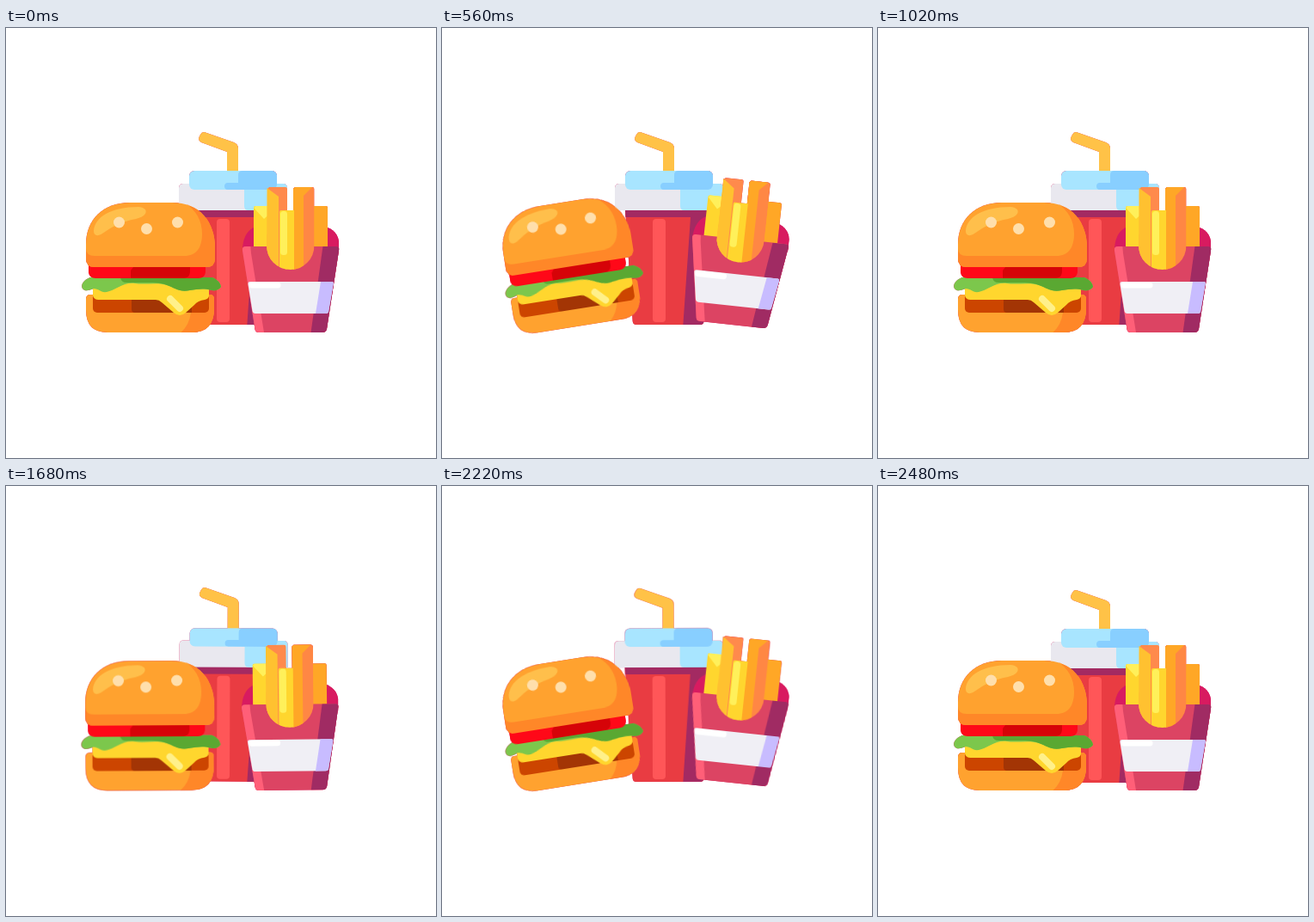
Animation of 500x500 px, one loop 3020 ms. Source, as an HTML page:

```html
<!DOCTYPE html>
<html lang="en">
<head>
<meta charset="utf-8">
<title>Burger, drink and fries</title>
<style>
html, body { margin: 0; height: 100%; overflow: hidden; background: #fff; }
svg { display: block; width: 100%; height: 100%; }
#scene { filter: drop-shadow(0 0 .5px #e02060); }
</style>
</head>
<body>
<svg viewBox="0 0 500 500">
  <defs>
    <clipPath id="pocket"><path d="M303 140H358.500V253A27.700 28 0 0 1 303 253Z"/></clipPath>
    <clipPath id="bunShape"><path id="bunPath" d="M93 251C93 223 113 203 144 203H193C225 203 243 225 243 256V268Q243 278 233 278H103Q93 278 93 268Z"/></clipPath>
    <clipPath id="baseShape"><path id="basePath" d="M93 315Q93 310 98 310H237Q242 310 242 315V326Q242 354 216 354H118Q93 354 93 328Z"/></clipPath>
    <clipPath id="boxShape"><path id="boxPath" d="M279 254H384Q388 254 387 259L373 350Q372 354 368 354H294Q290 354 289.500 350L275 259Q274 254 279 254Z"/></clipPath>
    <clipPath id="lidShape"><rect x="213" y="166" width="102" height="22" rx="6"/></clipPath>
    <clipPath id="cupShape"><path d="M213 210H314L304.500 341Q304 345 300 345H226Q222 345 221.700 341Z"/></clipPath>
  </defs>

  <g id="scene">
  <g id="cup">
    <path id="straw" fill="#ffc247" d="M232 121.500L265 133Q270 135 270 140V200H257V144L227 133Q223 131 224.500 127L226 124Q228 120 232 121.500Z"/>
    <g clip-path="url(#cupShape)">
      <path fill="#e93c42" d="M205 205H320V350H205Z"/>
      <path fill="#a32a62" d="M205 205H320V350H280L289 220H205Z"/>
      <rect x="245" y="222" width="15" height="120" rx="4" fill="#ff5658"/>
    </g>
    <path fill="#e9e8ef" d="M201 212V186Q201 181 206 181H322Q327 181 327 186V212Z"/>
    <path fill="#a8e5ff" d="M277 181H322Q327 181 327 186V212H282Q277 212 277 207Z"/>
    <g id="lid">
      <g clip-path="url(#lidShape)">
        <path fill="#a8e5ff" d="M210 160H320V190H210Z"/>
        <path fill="#88cfff" d="M275 166H320V188H258A4 4 0 0 1 258 180H270V171Q270 166 275 166Z"/>
      </g>
    </g>
  </g>

  <g id="fries">
    <path fill="#d81b60" d="M275 262V255Q277 235 291 231H371Q385 235 387 248V262Z"/>
    <g id="fryA">
      <path fill="#ffd62e" d="M288 209Q288 207 290 207H312V275H288Z"/>
      <path fill="#fff05a" d="M290 207H312V211L300 222L288 209Z"/>
    </g>
    <path id="fryD" fill="#ffa726" d="M350 207H372Q374 207 374 209V275H350Z"/>
    <use href="#boxPath" fill="#dc4463"/>
    <g clip-path="url(#boxShape)">
      <path fill="#ff5f78" d="M270 250H284L285 262L300 354H286Z"/>
      <path fill="#a02b63" d="M369 250H392L375 358H354Z"/>
    </g>
    <path fill="#f0eff5" d="M284 295H379Q381 295 380.700 297L375 330Q374.500 332 372 332H290Q287 332 286.500 329L281.500 298Q281 295 284 295Z"/>
    <path fill="#c8bcff" d="M366 295H379Q381 295 380.700 297L375 330Q374.500 332 372 332H360Z"/>
    <path d="M286 299H316" stroke="#fff" stroke-width="7" stroke-linecap="round"/>
    <g clip-path="url(#pocket)">
      <path fill="#ffc130" d="M303 240H319V290H303Z"/>
      <g id="fryB">
        <path fill="#ff8a4c" d="M306 185H325Q327 185 327 187V290H304V187Z"/>
        <path fill="#ffc130" d="M303.500 186L317 196V300H303Z"/>
      </g>
      <g id="fryC">
        <path fill="#ff8744" d="M336 185H356Q358 185 358.500 187V310H334V187Z"/>
        <path fill="#ffa726" d="M336 185H356L346 195V310H334V187Z"/>
      </g>
      <g id="fryM">
        <path fill="#ffd62e" d="M318 214Q318 212 320 212H335V310H318Z"/>
        <rect x="319" y="213" width="8" height="51" rx="3.500" fill="#fff05a"/>
      </g>
    </g>
  </g>

  <g id="burger">
    <g id="base">
      <use href="#basePath" fill="#ffa22f"/>
      <path clip-path="url(#baseShape)" fill="#ff8728" d="M245 300V360H194Q212 352 215 331V300Z"/>
    </g>
    <g id="filling">
      <rect x="101" y="309" width="135" height="22" rx="5" fill="#cc4500"/>
      <path fill="#a33505" d="M150 310H216V331H150Q146 331 146 327V314Z"/>
      <path fill="#ffd62e" d="M101 292H236V311Q236 315 231 316Q223 317 219 322L209 331Q202 337 195 331L181 319Q178 316 174 316H107Q101 316 101 309Z"/>
      <path d="M191 315L202 326" stroke="#fff08a" stroke-width="8" stroke-linecap="round"/>
    </g>
    <g id="lettuce">
      <path fill="#7cc74c" d="M98 290H240Q249 294 250 301Q247 306 239 305C229 302 222 304 214 305C202 308 196 302 187 299C176 295 162 299 150 297C137 295 127 305 117 307C110 308 108 303 102 303C97 305 92 307 89 303C86 298 92 292 98 290Z"/>
      <path fill="#5aa832" d="M133 290H240Q249 294 250 301Q247 306 239 305C229 302 222 304 214 305C202 308 196 302 187 299C180 296 173 296 165 296H140Q134 296 133 290Z"/>
    </g>
    <path fill="#ff0818" d="M96 276H232V284Q231 291 224 291H104Q97 291 96 284Z"/>
    <path fill="#d60308" d="M148 278H214V284Q213 291 207 291H145V282Z"/>
    <use href="#bunPath" fill="#ffa22f"/>
    <path clip-path="url(#bunShape)" fill="#ff8728" d="M203 200C219 209 228 222 228 239C228 255 222 265 207 265H103Q93 265 93 256V280H246V200Z"/>
    <path fill="#ffbf4b" d="M102 236C103 220 122 208 154 208C167 209 165 219 151 222C134 225 122 232 112 239C106 243 102 241 102 236Z"/>
    <g fill="#ffdfac">
      <circle cx="131.500" cy="226" r="6.500"/>
      <circle cx="163.500" cy="233.500" r="6.500"/>
      <circle cx="199.500" cy="226" r="6.500"/>
    </g>
  </g>
  </g>
</svg>
<script>
const LOOP = 3020, STEP = 20, STARTS = [200, 1660];

// Smooth interpolation through flat time, value pairs.
function track(t, ...keys) {
  if (t <= keys[0]) return keys[1];
  for (let i = 2; i < keys.length; i += 2) {
    if (t < keys[i]) {
      const x = (t - keys[i - 2]) / (keys[i] - keys[i - 2]);
      return keys[i - 1] + (keys[i + 1] - keys[i - 1]) * x * x * (3 - 2 * x);
    }
  }
  return keys[keys.length - 1];
}

const pose = (id, transform) => document.getElementById(id).setAttribute("transform", transform);
const move = (id, x, y) => pose(id, `translate(${x} ${y})`);
const pop = (t, delay) => -track(t - delay, 60, 0, 150, 14, 260, 0);

function draw(now) {
  const time = Math.floor((now % LOOP) / STEP) * STEP;
  const t = time - STARTS[time >= STARTS[1] ? 1 : 0];

  const open = track(t, 0, 0, 180, 1, 630, 1, 760, 0);
  const dip = 12 * open * (1 - open); // upper layers sink while the burger swings
  pose("burger", `translate(${-6.5 * open} ${dip - 1.7 * open}) rotate(${-9 * open} 168 354)`);
  move("base", 0, -6 * open - dip);
  move("filling", 0, -3 * open - dip / 2);
  move("lettuce", 0, -2 * open - dip / 3);

  const hop = track(t, 0, 0, 100, 12, 200, 0, 540, 0, 650, 12, 760, 0);
  const tilt = track(t, 0, 0, 100, 2, 200, 0, 540, 0, 650, -1.7, 760, 0);
  pose("cup", `translate(0 ${-hop}) rotate(${tilt} 263 345)`);
  pose("lid", `translate(0 188) scale(1 ${1 - hop / 43}) translate(0 -188)`);
  move("straw", 0, -track(t, 0, 0, 110, 19, 200, 8, 280, 0, 320, 3, 360, 0, 540, 0, 645, 14, 760, 0, 790, 2, 820, 0));

  const shift = track(t, 0, 0, 180, 1, 630, 1, 780, 0);
  const lean = track(t, 0, 0, 30, -0.8, 180, 6.2, 550, 6.2, 680, 0.6, 760, 0);
  const fan = track(t, 550, 0, 650, 1, 760, 0);
  pose("fries", `translate(${5.5 * shift} ${-9 * shift}) rotate(${lean} 331 354)`);
  pose("fryA", `translate(${-3 * fan} ${pop(t, -50)}) rotate(${-3 * fan} 300 255)`);
  move("fryB", 2.5 * fan, pop(t, -25));
  move("fryM", 2 * fan, pop(t, -30));
  move("fryC", 2.5 * fan, pop(t, 10));
  pose("fryD", `translate(${4 * fan} ${pop(t, 100)}) rotate(${5 * fan} 362 255)`);
}

const start = performance.now();
function tick() {
  draw(performance.now() - start);
  requestAnimationFrame(tick);
}
tick();
</script>
</body>
</html>
```
